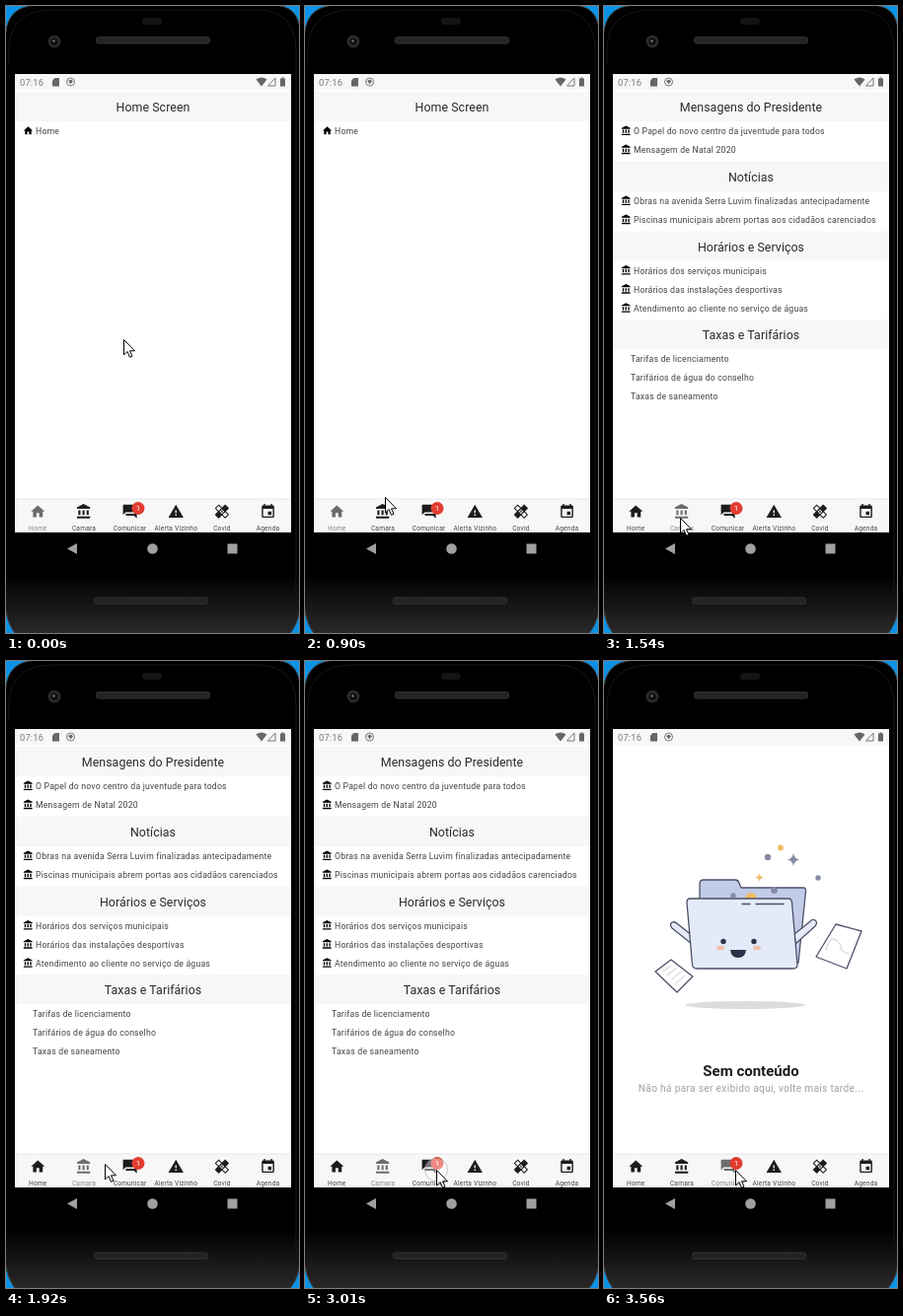
An HTML page that plays this animation: 297 px wide and 636 px high, repeating every 4170 ms.

```html
<!DOCTYPE html>
<html lang="pt">
<head>
<meta charset="utf-8">
<style>
html, body { margin: 0; width: 100%; height: 100%; overflow: hidden; background: #0a93e6; }
svg { display: block; }
text { font-family: Roboto, Arial, sans-serif; }
.title { font-size: 12.4px; letter-spacing: .05px; fill: #2a2a2c; text-anchor: middle; }
.item { font-size: 8.7px; letter-spacing: .2px; fill: #444; }
.tab { font-size: 6.6px; letter-spacing: .2px; text-anchor: middle; fill-opacity: .8; }
</style>
</head>
<body>
<svg width="297" height="636" viewBox="0 0 297 636">
  <defs>
    <linearGradient id="sheen" x2="0" y2="1">
      <stop offset=".9" stop-color="#000"/>
      <stop offset="1" stop-color="#2c2c2c"/>
    </linearGradient>
  </defs>

  <!-- phone body -->
  <path d="M-1 32C1 9 10 -1 36 -1H268C288 -1 296 7 298 24V612C296 626 291 633 285 640H12C5 632 1 624 -1 608Z" fill="url(#sheen)" stroke="#444"/>
  <path d="M3 60V42Q5 5 46 4H258Q292 6 294 42V600" fill="none" stroke="#161616"/>
  <rect x="138" y="12" width="20" height="7" rx="3.5" fill="#141416"/>
  <circle cx="49" cy="36" r="6.5" fill="#292a2c"/>
  <circle cx="49" cy="36" r="3.5" fill="#0c0d10"/>
  <circle cx="48.5" cy="35.5" r="1.2" fill="#777"/>
  <g fill="#242424" stroke="#303030">
    <rect x="91.5" y="31.500" width="115" height="6.500" rx="2"/>
    <rect x="89.5" y="600" width="115" height="6.500" rx="2"/>
  </g>
  <g fill="#a0a0a0">
    <path d="M62 550.5L72 545V556Z"/>
    <circle cx="148.500" cy="550.500" r="5.300"/>
    <rect x="224.500" y="545.500" width="10" height="10"/>
  </g>

  <!-- screen -->
  <rect x="9" y="69" width="280" height="465" fill="#fff"/>
  <rect x="9" y="69" width="280" height="16" fill="#f7f7f7"/>
  <text x="14" y="81" font-size="9.300" letter-spacing=".2" fill="#777">07:16</text>
  <g fill="#666">
    <path d="M49.500 73H54V81.500H47V75.500Z"/>
    <circle cx="65.500" cy="77" r="4" fill="none" stroke="#777"/>
    <path d="M63 76L66 74.500 68 76.500 65 79.500 64.500 77.500Z"/>
    <path d="M253.500 74.500Q259 70.500 264.500 74.500L259 81.500Z"/>
    <path d="M273 73V81H265.500Z" fill="none" stroke="#777"/>
    <path d="M278 73.500H279.500V72.500H281.500V73.500H283V81.500H278Z"/>
  </g>

  <g id="home"></g>
  <g id="town"></g>
  <g id="empty">
    <g id="art" stroke-linejoin="round" stroke-linecap="round">
      <ellipse cx="143" cy="349" rx="61" ry="4" fill="#dcdcdc"/>
      <g stroke="#4b5068" stroke-width="1.300">
        <path d="M97 246V226Q97 222 101 222H133Q136 222 137 225L139 230H202Q205 230 204.500 234L197 306H100Z" fill="#c2cce9"/>
        <path d="M143 241A6 6 0 0 1 155 241Z" fill="#edbd63" stroke="none"/>
        <path d="M89 287L69 271Q66 267 69 265 72 264 75 267L90 279Z" fill="#e4eaf8"/>
        <path d="M194 287L214 269Q217 265 214 263 211 261 208 265L193 277Z" fill="#e4eaf8"/>
        <path d="M87 241H187Q190 241 190.500 245L196 308Q196 312 192 312H94Q90 312 89.500 308L84 245Q84 241 87 241Z" fill="#e4eaf8"/>
        <path d="M140 246.500H148M154 246.500H182" fill="none"/>
        <path d="M235 267L261 274 246 312 215 300Z" fill="#fff"/>
        <path d="M52 315L68 303 90 320 74 336Z" fill="#fff"/>
      </g>
      <path d="M225 293Q229 278 235 283T240 291 248 297M60 315L68 309M64 319L74 311M69 323L78 315M73 327L82 319" fill="none" stroke="#c8cad2"/>
      <g fill="#f3bfa8">
        <ellipse cx="118" cy="291" rx="4" ry="2.200"/>
        <ellipse cx="155" cy="291" rx="4" ry="2.200"/>
      </g>
      <g fill="#2d3248">
        <circle cx="121" cy="284.500" r="2.700"/>
        <circle cx="152" cy="284.500" r="2.700"/>
        <path d="M128 293H144Q143 301 136 301T128 293Z"/>
      </g>
      <g fill="#858aa3">
        <circle cx="166" cy="199" r="3.200"/>
        <circle cx="217" cy="220" r="2.700"/>
        <circle cx="131" cy="238" r="2.700"/>
        <circle cx="172.500" cy="232.500" r="3.400"/>
        <path d="M192 195Q193 200.500 198 201.500 193 202.500 192 208 191 202.500 186 201.500 191 200.500 192 195Z"/>
      </g>
      <g fill="#edbd63">
        <circle cx="179" cy="189.500" r="2.900"/>
        <path d="M157.500 215Q158 219 162 219.500 158 220 157.500 224 157 220 153 219.500 157 219 157.500 215Z"/>
      </g>
    </g>
    <text x="149" y="421" font-size="15" font-weight="700" text-anchor="middle" fill="#1c1c1e">Sem conteúdo</text>
    <text x="149" y="437" font-size="10.200" letter-spacing=".3" text-anchor="middle" fill="#a2a2a2">Não há para ser exibido aqui, volte mais tarde...</text>
  </g>

  <rect x="9" y="500" width="280" height="34" fill="#f7f7f7"/>
  <path d="M9 500H289" stroke="#e8e8e8"/>
  <g id="tabs"></g>
  <circle cx="134" cy="509.500" r="6.500" fill="#e23c30"/>
  <text x="134" y="512.300" font-size="8" text-anchor="middle" fill="#fff">1</text>

  <circle id="touch" r="11.500" fill="#fff" fill-opacity=".4" stroke="#999" stroke-opacity=".5"/>
  <path id="cursor" d="M.5 .5V16L4 12.500 6.500 18.300 9 17.200 6.500 11.800H11.500Z" fill="#fff" stroke="#000"/>
</svg>
<script>
const $ = id => document.getElementById(id);
const LOOP = 4170, DARK = '#1c1c1e', GREY = '#6c6c6f';

const icons = {
  home: 'M10 20v-6h4v6h5v-8h3L12 3 2 12h3v8z',
  bank: 'M4 10v7h3v-7H4zm6 0v7h3v-7h-3zM2 22h19v-3H2v3zm14-12v7h3v-7h-3zm-4.5-9L2 6v2h19V6l-9.5-5z',
  chat: 'M21 6h-2v9H6v2c0 .55.45 1 1 1h11l4 4V7c0-.55-.45-1-1-1zm-4 6V3c0-.55-.45-1-1-1H3c-.55 0-1 .45-1 1v14l4-4h10c.55 0 1-.45 1-1z',
  warn: 'M1 21h22L12 2 1 21zm12-3h-2v-2h2v2zm0-4h-2v-4h2v4z',
  heal: 'M17.7 12l4-4c.4-.4.4-1 0-1.400l-4.300-4.300c-.4-.4-1-.4-1.400 0l-4 4L8 2.300c-.4-.4-1-.4-1.400 0L2.250 6.600c-.4.4-.4 1 0 1.400l4 4-4 4c-.4.4-.4 1 0 1.400l4.350 4.350c.4.4 1 .4 1.400 0l4-4 4 4c.4.4 1 .4 1.400 0l4.300-4.350c.4-.4.4-1 0-1.400zM11 9h2v2h-2zM7.300 11L3.660 7.340 7.300 3.700l3.600 3.630zM9 11h2v2H9zM11 13h2v2h-2zM13 11h2v2h-2zM16.700 20.300L13 16.700l3.700-3.600 3.600 3.600z',
  event: 'M17 12h-5v5h5v-5zM16 1v2H8V1H6v2H5c-1.100 0-2 .9-2 2v14c0 1.100.9 2 2 2h14c1.100 0 2-.9 2-2V5c0-1.100-.9-2-2-2h-1V1h-2zm3 18H5V8h14v11z'
};
const icon = (name, x, y, scale) =>
  `<path fill-rule="evenodd" transform="translate(${x} ${y}) scale(${scale}) translate(-12 -12)" d="${icons[name]}"/>`;

const section = (y, title, kind, items) =>
  `<rect x="9" y="${y}" width="280" height="30" fill="#f7f7f7"/>
   <text class="title" x="149" y="${y + 20}">${title}</text>` +
  items.map((label, i) => {
    const base = y + 43.2 + i * 19.1;
    return (kind ? icon(kind, 22.5, base - 3.7, .46) : '') +
      `<text class="item" x="${kind ? 30 : 27}" y="${base}">${label}</text>`;
  }).join('');

$('home').innerHTML = section(87, 'Home Screen', 'home', ['Home']);
$('town').innerHTML =
  section(87, 'Mensagens do Presidente', 'bank',
    ['O Papel do novo centro da juventude para todos', 'Mensagem de Natal 2020']) +
  section(158, 'Notícias', 'bank',
    ['Obras na avenida Serra Luvim finalizadas antecipadamente',
     'Piscinas municipais abrem portas aos cidadãos carenciados']) +
  section(228.5, 'Horários e Serviços', 'bank',
    ['Horários dos serviços municipais', 'Horários das instalações desportivas',
     'Atendimento ao cliente no serviço de águas']) +
  section(318, 'Taxas e Tarifários', '',
    ['Tarifas de licenciamento', 'Tarifários de água do conselho', 'Taxas de saneamento']);

$('tabs').innerHTML = [
  ['home', 'Home'], ['bank', 'Camara'], ['chat', 'Comunicar'],
  ['warn', 'Alerta Vizinho'], ['heal', 'Covid'], ['event', 'Agenda']
].map(([name, label], i) => {
  const x = 32.3 + i * 46.65;
  return `<g>${icon(name, x, 512.8, .7)}<text class="tab" x="${x}" y="532">${label}</text></g>`;
}).join('');

// Each entry holds from its time until the next one.
const moves = [
  [0, 119, 338], [210, 121, 340], [290, 124, 348], [360, 123, 366], [440, 119, 392],
  [520, 113, 418], [590, 106, 440], [670, 98, 457], [750, 91, 472], [830, 86, 487],
  [900, 81, 498], [1000, 78, 511], [1070, 77, 517], [1140, 77, 519], [1620, 78, 518],
  [1700, 80, 517], [1770, 85, 514], [1850, 91, 512], [1920, 100, 510], [2000, 108, 509],
  [2070, 114, 510], [2150, 119, 511], [2230, 123, 512], [2300, 127, 514], [2380, 130, 515],
  [2460, 133, 516]
];
const fades = [[0, 0], [3250, .1], [3330, .38], [3410, .65], [3480, .88], [3560, 1]];
const pages = ['home', 'town', 'empty'];
const at = (steps, t) => steps.findLast(step => step[0] <= t);
const show = (id, on) => $(id).setAttribute('visibility', on ? 'visible' : 'hidden');

function draw(t) {
  const [, x, y] = at(moves, t);
  const page = t < 1460 ? 0 : t < 3250 ? 1 : 2;
  pages.forEach((id, i) => show(id, i === page));
  [...$('tabs').children].forEach((tab, i) => tab.setAttribute('fill', i === page ? GREY : DARK));
  $('art').setAttribute('opacity', at(fades, t)[1]);
  $('cursor').setAttribute('transform', `translate(${x} ${y})`);
  $('touch').setAttribute('transform', `translate(${x} ${y})`);
  show('touch', t >= 1220 && t < 1390 || t >= 3010 && t < 3180);
}

const start = performance.now();
function frame() {
  draw((performance.now() - start) % LOOP);
  requestAnimationFrame(frame);
}
frame();
</script>
</body>
</html>
```
